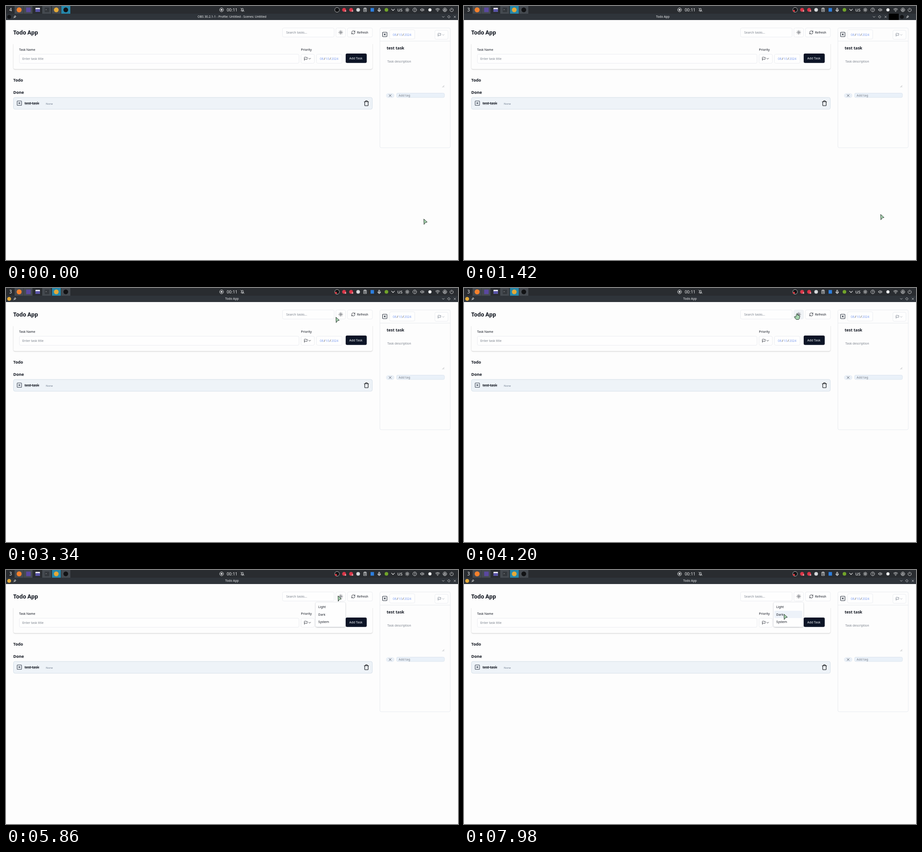
These frames come from a looping animation (998x561 px, 8 s). An HTML page:

```html
<!DOCTYPE html>
<html lang="en">
<head>
<meta charset="utf-8">
<title>Todo App</title>
<style>
  html, body { margin: 0; width: 100%; height: 100%; overflow: hidden; background: #fdfdfd; }
  svg { display: block; width: 100%; height: 100%; }
  text { font-family: "Noto Sans", "Open Sans", sans-serif; font-size: 6.95px; fill: #10151f; white-space: pre; }
  .icon { fill: none; stroke-linecap: round; stroke-linejoin: round; }
  .card { filter: drop-shadow(0 1px 1.2px rgba(0, 0, 0, .2)); }
</style>
</head>
<body>
<svg id="stage" viewBox="0 0 998 561"></svg>
<script>
const LOOP = 8000;
const INK = '#10151f', MUTED = '#7a818c', LINE = '#ebedf1', BAR = '#eff0f1', DARK = '#111214';

// Icon outlines on a 24 unit grid
const ICONS = {
  sun: 'M16 12a4 4 0 1 1-8 0 4 4 0 0 1 8 0M12 2v2M12 20v2M4.9 4.9l1.4 1.4M17.7 17.7l1.4 1.4M2 12h2M20 12h2M6.3 17.7l-1.4 1.4M19.1 4.9l-1.4 1.4',
  refresh: 'M3 12a9 9 0 0 1 9-9 9.75 9.75 0 0 1 6.74 2.74L21 8M21 3v5h-5M21 12a9 9 0 0 1-9 9 9.75 9.75 0 0 1-6.74-2.74L3 16M8 16H3v5',
  flag: 'M4 15s1-1 4-1 5 2 8 2 4-1 4-1V3s-1 1-4 1-5-2-8-2-4 1-4 1zM4 22v-7',
  chevron: 'M6 9l6 6 6-6',
  trash: 'M3 6h18M19 6v14c0 1-1 2-2 2H7c-1 0-2-1-2-2V6M8 6V4c0-1 1-2 2-2h4c1 0 2 1 2 2v2',
  squareX: 'M5 3h14a2 2 0 0 1 2 2v14a2 2 0 0 1-2 2H5a2 2 0 0 1-2-2V5a2 2 0 0 1 2-2M15 9l-6 6M9 9l6 6',
  x: 'M18 6L6 18M6 6l12 12',
  diamond: 'M12 5l7 7-7 7-7-7z',
  pin: 'M14 4l6 6-3 1-3 4-1 3-7-7 3-1 4-3zM9 15l-5 5',
  bell: 'M5 17h14c-2-2-2-4-2-8a5 5 0 0 0-10 0c0 4 0 6-2 8M10 20h4M3 3l18 18',
  clipboard: 'M5 4h14v17H5zM9 2h6v4H9zM8 11h8M8 15h8',
  mic: 'M12 3a3 3 0 0 1 3 3v6a3 3 0 0 1-6 0V6a3 3 0 0 1 3-3M5 12a7 7 0 0 0 14 0M12 19v3',
  help: 'M22 12a10 10 0 1 1-20 0 10 10 0 0 1 20 0M9 9a3 3 0 1 1 3 4v1M12 17v.5',
  volume: 'M3 9v6h4l5 5V4L7 9zM16 9a5 5 0 0 1 0 6M19 6a9 9 0 0 1 0 12',
  wifi: 'M2 9a15 15 0 0 1 20 0M5 13a10 10 0 0 1 14 0M9 17a5 5 0 0 1 6 0M12 20v.5',
  lock: 'M22 12a10 10 0 1 1-20 0 10 10 0 0 1 20 0M8 11h8v6H8zM9.500 11V9a2.500 2.500 0 0 1 5 0v2',
  power: 'M12 2v10M7 5a9 9 0 1 0 10 0',
};

const icon = (name, cx, cy, size, color = INK, width = 2) =>
  `<path class="icon" d="${ICONS[name]}" stroke="${color}" stroke-width="${width}"
    transform="translate(${cx - size / 2} ${cy - size / 2}) scale(${size / 24})"/>`;
const text = (s, x, y, attrs = '') => `<text x="${x}" y="${y}" style="${attrs}">${s}</text>`;
const box = (x, y, w, h, fill = '#fefefe', stroke = LINE, rx = 3, attrs = '') =>
  `<rect x="${x}" y="${y}" width="${w}" height="${h}" rx="${rx}" fill="${fill}" stroke="${stroke}" ${attrs}/>`;
const dot = (cx, cy, r, fill, attrs = '') => `<circle cx="${cx}" cy="${cy}" r="${r}" fill="${fill}" ${attrs}/>`;
const bold = size => `font-weight:600;font-size:${size}px`;

const date = (x, y) => ['08', '/', '10', '/', '2024'].map((part, i) =>
  text(part, x + [0, 9, 12.6, 21.6, 25.2][i], y, `fill:${part === '/' ? INK : '#7f9ff0'}`)).join('');

const titleBar = (title, color) => `
  <rect y="17" width="998" height="14" fill="#2f343a"/>
  ${dot(7, 24, 4.3, color)}${icon('pin', 19.5, 24, 7.5, BAR, 3)}
  ${text(title, 499, 26.3, `text-anchor:middle;font-size:6.75px;fill:${BAR}`)}
  ${icon('chevron', 965.5, 24, 9, BAR)}${icon('diamond', 978, 24, 9.5, BAR)}${icon('x', 991, 24, 8, BAR)}`;

const taskbar = () => `
  <rect width="998" height="17" fill="#292c30"/>
  <text id="desktop" x="10" y="11.800" style="font-size:10px;text-anchor:middle;fill:${BAR}"></text>
  ${[29, 49, 90].map(x => `<rect x="${x - 10}" width="19.500" height="17" fill="#454a50"/>`).join('')}
  <rect id="todoTask" x="101.500" width="19.500" height="17"/><rect id="recorderTask" x="122" width="20" height="17"/>
  ${dot(29, 8.5, 5.5, '#f4802c')}
  ${box(44.5, 3.5, 10, 10, '#5a48a0', 'none', 0)}
  ${box(65, 4, 10, 9, '#e6e4f0', 'none', 1)}${box(65, 7, 10, 6, '#5a55a8', 'none', 1)}
  ${box(85.5, 3.5, 10, 10, '#33373c', 'none', 1)}${text('&gt;', 87, 10, 'font-size:6px;fill:#bbb')}
  ${dot(111, 8.5, 5.2, '#e5aa38')}${dot(132, 8.5, 5.2, DARK)}
  ${dot(476, 8.5, 4.2, 'none', `stroke="${BAR}"`)}${box(474.3, 6.8, 3.4, 3.4, BAR, 'none', .5)}
  ${text('00:11', 487.2, 11.7, `font-size:9.4px;fill:${BAR}`)}${icon('bell', 522, 8.5, 10, BAR)}
  ${dot(731, 8.5, 5.2, DARK, 'stroke="#d9dadb" stroke-width=".8"')}
  <g id="recording">${dot(728.5, 10.8, 2.4, '#d93a43')}</g>
  ${[746.5, 762].map(x => dot(x, 8.5, 4.3, '#da3648') + dot(x + 3, 11, 1.8, '#e8a0a6')).join('')}
  ${dot(777.5, 8.5, 4, '#d5d8da')}
  ${icon('clipboard', 793, 8.5, 10, BAR)}${box(805, 4.5, 7.5, 8, '#2c7fe0', 'none', 0)}
  ${icon('mic', 824, 8.5, 10, BAR, 2.5)}${dot(840, 8.5, 4, '#71a42a')}${icon('chevron', 854.5, 8.5, 13, BAR)}
  ${text('us', 864, 11.8, `font-size:10.5px;fill:${BAR}`)}
  ${icon('sun', 886, 8.5, 10, BAR, 2.5)}${icon('help', 902.5, 8.5, 10, BAR)}${icon('volume', 919, 8.5, 10, BAR)}
  ${dot(936, 8.5, 3.5, BAR)}${icon('wifi', 953, 8.5, 11, BAR)}${icon('lock', 969, 8.5, 10, BAR)}${icon('power', 984, 8.5, 10, BAR)}`;

const mainPane = () => `
  ${text('Todo App', 16, 62.8, bold(12.3) + ';letter-spacing:-.02em')}
  ${box(610.5, 48.5, 114, 20)}${text('Search tasks...', 618.7, 61.1, `fill:${MUTED}`)}
  <rect id="themeButton" x="728.500" y="48.500" width="21" height="20" rx="3" stroke="${LINE}"/>
  ${icon('sun', 739, 58.3, 10.3)}
  ${box(754, 48.5, 55, 20)}${icon('refresh', 766.8, 58.4, 9.6)}${text('Refresh', 775, 60.8, 'font-weight:500')}
  <g class="card">${box(16.5, 80, 792.5, 59.3, '#fdfdfd', 'none', 4)}</g>
  <rect x="14" y="72" width="798" height="12" fill="#fdfdfd"/>
  ${text('Task Name', 29, 99, 'font-weight:500')}${text('Priority', 651.3, 99, 'font-weight:500')}
  ${box(29.5, 106.5, 617.5, 20)}${text('Enter task title', 36, 119.4, `fill:${MUTED}`)}
  ${box(651.5, 106.5, 29.5, 20)}${icon('flag', 662, 116.5, 9)}${icon('chevron', 670.5, 116.3, 9)}
  ${box(685.5, 106.5, 56.5, 20)}${date(693, 119.2)}
  ${box(750, 105, 46.5, 20.7, '#0c1426', 'none')}${text('Add Task', 758, 118, 'font-weight:500;fill:#f6f8fb')}
  ${text('Todo', 16, 166.8, bold(9.1))}${text('Done', 16, 193.7, bold(9.1))}
  ${box(16.5, 202, 792.3, 26, '#eef3f8', '#d5dfe8', 3.5)}
  ${icon('squareX', 29.5, 214.6, 13, '#3a4352')}
  ${text('test task', 41, 217.5, 'font-weight:500;font-size:8.1px')}
  <rect x="41" y="214.500" width="32.500" height="1" fill="${INK}"/>
  ${text('None', 88, 217.6, 'font-size:6.1px;font-weight:500;fill:#6d7a8c')}
  ${icon('trash', 795.8, 214.8, 13, '#05070b')}`;

const detailPane = () => `
  ${box(825.5, 48.5, 155.5, 264.5, '#fdfdfd', '#e8ebef')}
  <path d="M826 77.500H981" stroke="#e8ebef"/>
  ${icon('squareX', 836.3, 62.8, 13, '#262f3d')}
  ${box(847, 52.5, 55.5, 20.5)}${date(854, 65.5)}
  ${box(947, 53.5, 29, 20)}${icon('flag', 957, 63.6, 8.5, '#596273')}${icon('chevron', 965.5, 63.8, 8, '#8f96a2')}
  ${text('test task', 840.5, 96, bold(8.9))}
  ${text('Task description', 842, 125.2, `fill:${MUTED}`)}
  <path d="M963.500 179.500l4-4M966 179.500l1.500-1.500" stroke="#8b8f96" stroke-width=".7"/>
  ${box(839, 192.5, 18.5, 10.5, '#e9eff6', 'none', 5.2)}${icon('x', 848.2, 197.8, 9.5, '#3a4352')}
  ${box(862.5, 192.5, 105.5, 9.5, '#eaf1f9', '#dbe4ee', 2.5)}${text('Add tag', 867, 200, `fill:${MUTED}`)}`;

const menu = () => `
  <g id="menu">
    <g class="card">${box(683.5, 71, 66, 54.5, '#fefefe', '#eceef2')}</g>
    <rect id="menuHover" x="685.500" width="61.500" height="16.300" rx="2" fill="#edf2f9"/>
    ${['Light', 'Dark', 'System'].map((s, i) => text(s, 689.6, 84 + 16.65 * i)).join('')}
  </g>`;

const cursors = () => `
  <g id="cursor" stroke="#26352c" stroke-linejoin="round">
    <path id="arrow" d="M.500.500L8 7.300 3.900 8.300 1 12.500z" fill="#a9d8b2"/>
    <path id="hand" d="M2.500-1c1-1 2 0 2 1v2l3 .5c1.500.3 2 1.200 1.800 2.500L8.500 9.500 7 11.500H1.500L-2.500 6.500c-.8-1.200.5-2 1.500-1.200l1.500 1z" fill="#a9d8b2"/>
  </g>`;

document.getElementById('stage').innerHTML = `
  ${mainPane()}${detailPane()}
  <rect y="17" width="998" height="14"/>
  <g id="todoBar">${titleBar('Todo App', '#e5aa38')}</g>
  <g id="recorderBar">${titleBar('OBS 30.2.1-1 - Profile: Untitled - Scenes: Untitled', DARK)}</g>
  ${taskbar()}${menu()}${cursors()}`;

const el = Object.fromEntries([...document.querySelectorAll('[id]')].map(node => [node.id, node]));
const set = (id, name, value) => el[id].setAttribute(name, value);
const show = (id, on) => set(id, 'visibility', on ? 'visible' : 'hidden');

// Pointer path: time, x, y
const PATH = [
  [0, 922, 470], [900, 922, 470], [1420, 919.5, 460], [1660, 895, 417], [2220, 769, 188], [2400, 746, 130],
  [2700, 733, 82], [3340, 728, 64], [4200, 732, 58], [5060, 733.5, 55], [5600, 732.5, 56.5], [6700, 732.5, 57],
  [7050, 730, 61], [7600, 714, 84], [7980, 706, 97], [LOOP, 706, 97],
];
function pointerAt(t) {
  const i = PATH.findIndex(p => p[0] > t);
  const [a, b] = [PATH[i - 1], PATH[i]];
  const k = (t - a[0]) / (b[0] - a[0]);
  return [a[1] + (b[1] - a[1]) * k, a[2] + (b[2] - a[2]) * k];
}

const SWITCH = 503, MENU_OPEN = 4870, MENU_TIME = 400, DESKTOP_STEP = 1020;

function draw(t) {
  // Critically damped slide between the two desktops
  const w = Math.max(0, t - SWITCH) * 0.00495;
  const left = DESKTOP_STEP * (1 + w) * Math.exp(-w);
  set('todoBar', 'transform', `translate(${-left})`);
  set('recorderBar', 'transform', `translate(${DESKTOP_STEP - left})`);

  const switched = t >= SWITCH;
  el.desktop.textContent = switched ? 3 : 4;
  set('todoTask', 'fill', switched ? '#2687ab' : '#454a50');
  set('recorderTask', 'fill', switched ? '#454a50' : '#2687ab');
  show('recording', switched);

  const [x, y] = pointerAt(t);
  const opened = t >= MENU_OPEN;
  const overButton = x > 728.5 && y < 68.5 && t < MENU_OPEN + MENU_TIME;
  set('cursor', 'transform', `translate(${x} ${y})`);
  show('hand', overButton);
  show('arrow', !overButton);
  set('themeButton', 'fill', overButton ? '#f0f3f6' : '#fefefe');

  const k = Math.min(1, Math.max(0, (t - MENU_OPEN) / MENU_TIME));
  const p = 1 - (1 - k) ** 2;
  const scale = 0.95 + 0.05 * p;
  set('menu', 'opacity', p);
  set('menu', 'transform', `translate(749.5 ${71 - 4.2 * (1 - p)}) scale(${scale}) translate(-749.5 -71)`);
  const item = Math.floor((y - 73.3) / 16.65);
  set('menuHover', 'y', 73.3 + 16.65 * item);
  show('menuHover', opened && item >= 0);
}

function tick() {
  draw(performance.now() % LOOP);
  requestAnimationFrame(tick);
}
tick();
</script>
</body>
</html>
```
